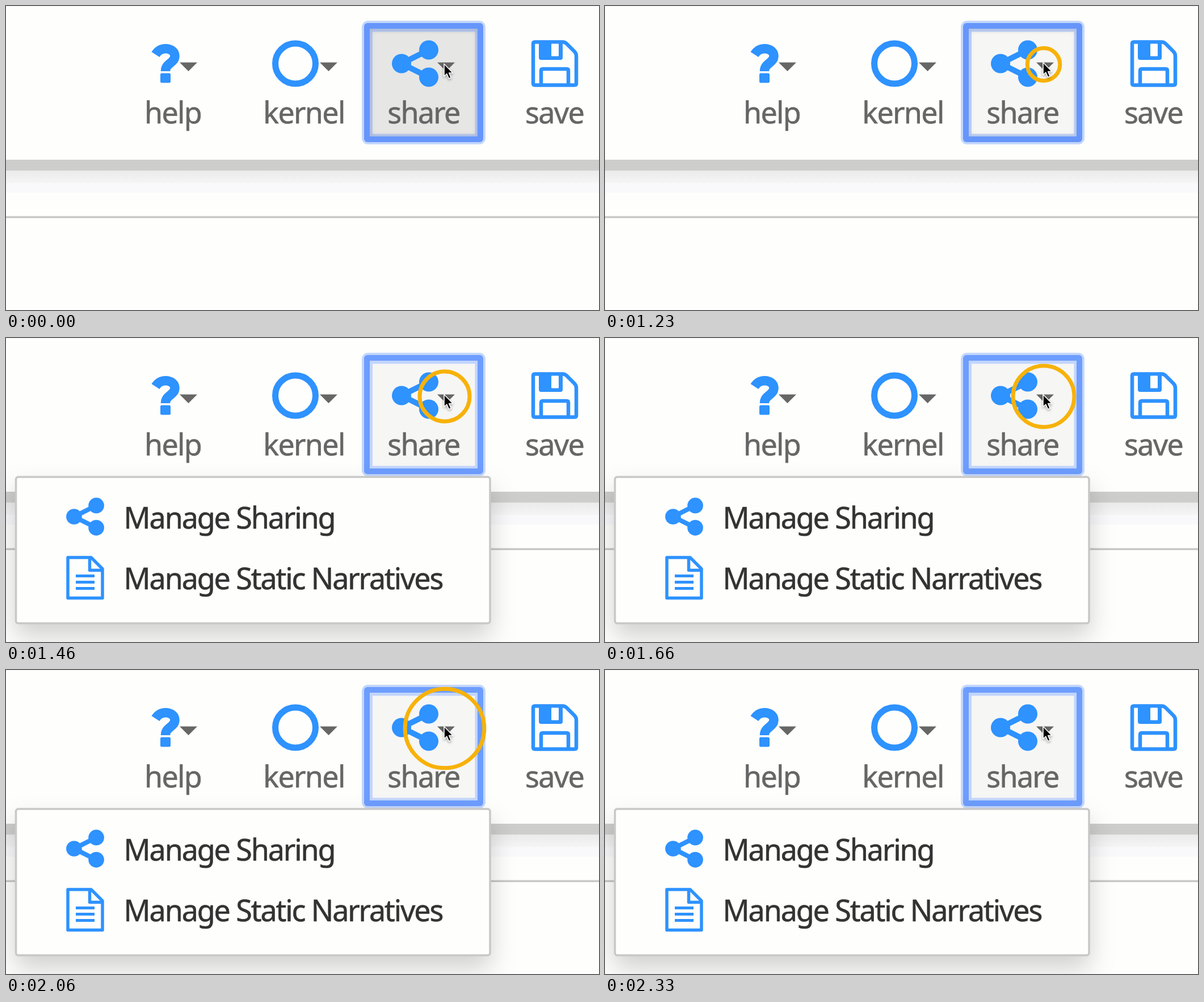
Recreate the animation shown at these times as an HTML page. Size 1045 by 536 pixels, loop 2.6 s.

```html
<!DOCTYPE html>
<html lang="en">
<head>
<meta charset="utf-8">
<title>Share menu</title>
<style>
  html, body { margin: 0; width: 100%; height: 100%; overflow: hidden; background: #fefefc; }
  svg { display: block; width: 100%; height: 100%; }
  text { font-family: "Noto Sans", "Open Sans", sans-serif; stroke-width: .6; }
  .label { font-size: 52px; letter-spacing: -1.7px; fill: #666; stroke: #666; text-anchor: middle; }
  .item { font-size: 52px; letter-spacing: -2.1px; fill: #333; stroke: #333; }
  .line { fill: none; stroke: #2e92ff; }
  .solid { fill: #2e92ff; }
  .panel { fill: #fefefc; stroke: #c8c8c8; stroke-width: 3.5; filter: drop-shadow(0 22px 22px rgba(0, 0, 0, .175)); }
  .pointer { filter: drop-shadow(0 2px 2px rgba(0, 0, 0, .35)); }
  .inset { fill: none; stroke: #000; stroke-width: 12; opacity: .1; filter: blur(4px); }
</style>
</head>
<body>
<svg viewBox="0 0 1045 536" preserveAspectRatio="none">
  <defs>
    <linearGradient id="barShade" x1="0" y1="0" x2="0" y2="1">
      <stop offset="0" stop-color="#ebebeb"/>
      <stop offset="1" stop-color="#f5f5f5"/>
    </linearGradient>
    <clipPath id="buttonClip"><rect x="641" y="40" width="190" height="190"/></clipPath>
    <g id="shareIcon">
      <path class="line" stroke-width="10" d="M24-24L-24 0L24 24"/>
      <circle class="solid" cx="-24" r="17"/>
      <circle class="solid" cx="24" cy="-24" r="17"/>
      <circle class="solid" cx="24" cy="24" r="17"/>
    </g>
    <path id="caret" fill="#666" d="M0 0H31L15.5 15.5Z"/>
  </defs>

  <rect width="1045" height="536" fill="#fefefc"/>
  <rect width="1045" height="1" fill="#f3f3f3"/>
  <rect y="271" width="1045" height="19.5" fill="#cdcdcb"/>
  <rect y="290.5" width="1045" height="21.5" fill="url(#barShade)"/>
  <rect y="312" width="1045" height="17" fill="#f9f9fc"/>
  <rect y="370.5" width="1045" height="3.5" fill="#c9c9c7"/>

  <path class="line" stroke-width="16.5" d="M263.5 85.5Q270 75.3 281 75.3C291 75.3 297.5 81 297.5 88C297.5 101 281 100 281 115"/>
  <rect class="solid" x="272" y="118.5" width="18" height="17" rx="2.5"/>
  <use href="#caret" x="306" y="99.5"/>
  <text class="label" x="294" y="207">help</text>

  <circle class="line" cx="510" cy="101.5" r="35.5" stroke-width="11"/>
  <use href="#caret" x="553" y="99.5"/>
  <text class="label" x="525" y="207">kernel</text>

  <rect x="627" y="26" width="218" height="218" rx="11" fill="#c3d7fc"/>
  <rect id="edge" x="631" y="30" width="210" height="210" rx="6"/>
  <rect id="rim" x="641" y="40" width="190" height="190"/>
  <rect id="face" x="646" y="45.5" width="180.5" height="180"/>
  <g id="press" clip-path="url(#buttonClip)"><rect class="inset" x="637" y="38" width="198" height="196"/></g>
  <use href="#shareIcon" x="721" y="101.5"/>
  <use href="#caret" x="760" y="99.5"/>
  <text class="label" x="736" y="207">share</text>

  <path class="line" stroke-width="6.5" d="M932 63.5H981Q985 63.5 988 66.5L1001.5 80Q1005 83.5 1005 88V136.5Q1005 139.5 1002 139.5H932Q929 139.5 929 136.5V66.5Q929 63.5 932 63.5Z"/>
  <path class="solid" d="M939 62H981V91Q981 95 977 95H943Q939 95 939 91Z"/>
  <rect x="961" y="66.5" width="13" height="22" rx="1" fill="#fefefc"/>
  <path class="line" stroke-width="6.5" d="M943 139V114Q943 111 946 111H988Q991 111 991 114V139"/>
  <text class="label" x="966.5" y="207">save</text>

  <g id="menu">
    <rect class="panel" x="17.5" y="245" width="835.5" height="258" rx="4"/>
    <use href="#shareIcon" transform="translate(139.5 315) scale(.815)"/>
    <text class="item" x="207.5" y="335.5">Manage Sharing</text>
    <g class="line" stroke-width="5.5" stroke-linejoin="round">
      <path d="M109 387H150L170 407V458.5H109Z"/>
      <path d="M147.500 387V409.500H170"/>
      <path stroke-width="5" d="M123 419.500H156M123 430.500H156M123 441.500H156"/>
    </g>
    <text class="item" x="207.5" y="442.5">Manage Static Narratives</text>
  </g>

  <circle id="ring" cx="773" cy="103" fill="none" stroke="#f7b209"/>
  <g id="pointer">
    <path class="pointer" fill="#000" stroke="#fff" stroke-width="1.6" stroke-linejoin="round" d="M0 0V22L4.700 17.500L8.500 26L12.200 24.500L8.700 16H15.500Z"/>
  </g>
</svg>
<script>
  const LOOP = 2600;
  const LIGHTEN = 830, PRESS = 930, RING_IN = 1060, OPEN = 1330, RING_OUT = 2330;
  const RING_ORIGIN = 1033, RING_WIDTH = 7;
  const el = id => document.getElementById(id);
  const set = (id, name, value) => el(id).setAttribute(name, value);
  const show = (id, on) => set(id, "visibility", on ? "visible" : "hidden");

  function draw(t) {
    const pressed = t < LIGHTEN || (t >= PRESS && t < OPEN);
    set("face", "fill", t < LIGHTEN ? "#e6e6e5" : "#f6f6f5");
    set("rim", "fill", t < LIGHTEN ? "#b9cbf4" : "#c2d5fb");
    set("edge", "fill", pressed ? "#6696fb" : "#6d9dfe");
    show("press", pressed);
    show("menu", t >= OPEN);
    set("pointer", "transform", `translate(772 ${t < PRESS ? 102 : 99.5})`);

    const ringOn = t >= RING_IN && t < RING_OUT;
    show("ring", ringOn);
    if (!ringOn) return;
    // The ring's area grows evenly, stepped at 30 frames a second.
    const tick = Math.floor((t + 6.7) * 0.03) / 0.03;
    const outer = 2.28 * Math.sqrt(Math.max(0, tick - RING_ORIGIN));
    set("ring", "r", Math.max(0, outer - RING_WIDTH / 2));
    set("ring", "stroke-width", RING_WIDTH);
  }

  const start = performance.now();
  function frame() {
    draw((performance.now() - start) % LOOP);
    requestAnimationFrame(frame);
  }
  frame();
</script>
</body>
</html>
```
